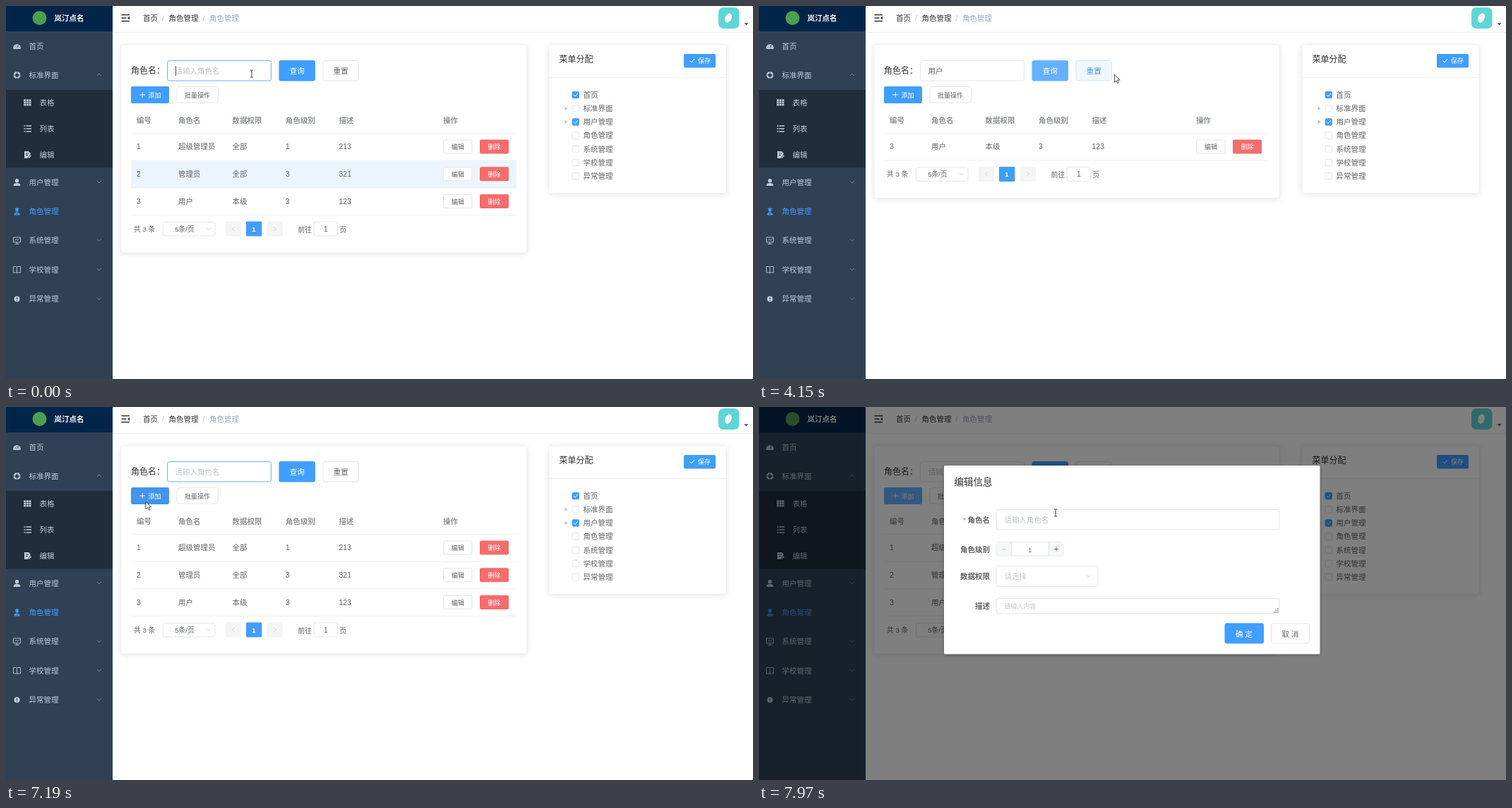
Animation of 1058 by 529 pixels, one loop 8000 ms. Source, as an HTML page:

```html
<!DOCTYPE html>
<html lang="zh">
<head>
<meta charset="utf-8">
<title>角色管理</title>
<style>
html, body { margin: 0; width: 100%; height: 100%; overflow: hidden; background: #fff; }
svg { display: block; width: 100vw; height: 100vh; }
text { font-family: "Liberation Sans", "Noto Sans CJK SC", "Noto Sans CJK", sans-serif; white-space: pre; }
.card { filter: drop-shadow(0 1.5px 4.5px rgba(0,0,0,.11)); }
.dialog { filter: drop-shadow(0 1px 2px rgba(0,0,0,.3)); }
</style>
</head>
<body>
<svg id="stage" viewBox="0 0 1058 529"></svg>
<script>
const BLUE = '#409eff', LIGHT = '#66b1ff', DARK = '#303133', GREY = '#606266',
  PALE = '#c0c4cc', EDGE = '#dcdfe6', LINE = '#ebeef5', MENU = '#bfcbd9';

// y is the visual middle of the line of text
const text = (x, y, s, size = 10.5, fill = GREY, more = '') =>
  `<text x="${x}" y="${y + size * .37}" font-size="${size}" fill="${fill}" ${more}>${s}</text>`;
const mid = 'text-anchor="middle"', bold = 'font-weight="700"';
const rect = (x, y, w, h, fill, r = 0, more = '') =>
  `<rect x="${x}" y="${y}" width="${w}" height="${h}" rx="${r}" fill="${fill}" ${more}/>`;
const framed = (x, y, w, h, more = '', fill = '#fff', stroke = EDGE, r = 3) =>
  rect(x + .5, y + .5, w - 1, h - 1, fill, r, `stroke="${stroke}" stroke-width=".8" ${more}`);
const path = (d, stroke, w = 1, fill = 'none', more = '') =>
  `<path d="${d}" stroke="${stroke}" stroke-width="${w}" fill="${fill}" ${more}/>`;
const shape = (d, fill) => path(d, 'none', 0, fill);
const at = (x, y, body, more = '') => `<g transform="translate(${x} ${y})" ${more}>${body}</g>`;
const rule = (x, y, w) => rect(x, y, w, .8, LINE);
const chevron = (x, y, dir, c = '#909399') =>
  at(x, y, `<g transform="rotate(${dir})">${path('M-3-1.5L0 1.5L3-1.5', c, .8)}</g>`);

const icons = {
  gauge: c => shape('M-5 4A5.3 5.3 0 1 1 5 4Z', c) + path('M0 2L2-2M-3 1h1M3 1h-1M-2-2l.6.6', '#304156', 1),
  ring: c => `<circle r="3.8" fill="none" stroke="${c}" stroke-width="2.5"/>` +
    path('M-5.5 0h3M2.5 0h3M0-5.5v3M0 2.5v3', '#304156', .8),
  grid: c => [0, 1, 2].map(i => [0, 1, 2].map(j => rect(i * 3.7 - 5.4, j * 3.2 - 4.6, 3, 2.6, c)).join('')).join(''),
  list: c => path('M-5-4h2M-5 0h2M-5 4h2M-2-4h7.5M-2 0h7.5M-2 4h7.5', c, 1.5),
  edit: c => shape('M-4.5-5h6l2.5 2.5V0L0 5h-4.5Z', c) + path('M-2.5-2h4M-2.5 .5h3', '#1f2d3d', .9) + path('M1.5 4.5L5 1', c, 1.5),
  user: c => `<circle cy="-2.3" r="2.7" fill="${c}"/>` + shape('M-5 5Q-5 1 0 1T5 5Z', c),
  role: c => `<circle cy="-2" r="2.3" fill="${c}"/>` + shape('M-3.5-3.5Q0-7 3.5-3.5ZM-4 5Q-4 1 0 1T4 5Z', c) + path('M-1 2.5L0 4L2 2.5', '#304156', .8),
  screen: c => path('M-5-4.5h10v7h-10ZM-3 5h6M0 2.5v2.5M-3 0L-1-2L1 0L3.5-3', c, .9),
  book: c => path('M-5-4.5H-1Q0-4.5 0-3.5Q0-4.5 1-4.5H5V4H1L0 4.8L-1 4H-5ZM0-3.5V4.5', c, .9),
  alert: c => `<circle r="4" fill="${c}"/>` + path('M0-2.2V.8M0 1.6v1', '#304156', 1.1)
};

const menu = [
  ['gauge', 57, '首页'], ['ring', 98, '标准界面', 180],
  ['grid', 137, '表格'], ['list', 174, '列表'], ['edit', 211, '编辑'],
  ['user', 250, '用户管理', 0], ['role', 291.5, '角色管理'], ['screen', 332.5, '系统管理', 0],
  ['book', 374, '学校管理', 0], ['alert', 415.5, '异常管理', 0]
].map(([icon, y, label, dir]) => {
  const sub = y > 120 && y < 230, c = icon === 'role' ? BLUE : MENU;
  return at(sub ? 30.5 : 15.5, y, icons[icon](c)) + text(sub ? 47.5 : 32.5, y, label, 10.5, c) +
    (dir === undefined ? '' : chevron(132, y - .5, dir));
}).join('');

const sidebar = rect(0, 0, 151, 529, '#304156') + rect(0, 0, 151, 36, '#012548') + rect(0, 119, 151, 110.5, '#1f2d3d') +
  '<circle cx="47.5" cy="17" r="10" fill="#4b9f50"/>' + text(68.5, 17, '岚汀点名', 10.5, '#fff', bold) + menu;

const header = path('M163.5 12.5h11.5M163.5 17h7M163.5 21.5h11.5', DARK, 1.3) + shape('M175 14.5v5l-3-2.5Z', DARK) +
  text(194, 17, '首页', 10.5, DARK) + text(221, 17, '/', 10.5, PALE) + text(230.5, 17, '角色管理', 10.5, DARK) +
  text(278.5, 17, '/', 10.5, PALE) + text(288, 17, '角色管理', 10.5, '#97a8be') +
  rect(151, 36.8, 907, .8, '#e6e8ec') + rect(1009, 2, 29.5, 30, '#5fd5d5', 7) +
  '<ellipse id="mascot" rx="4.5" ry="7" fill="#fff"/>' + shape('M1045.5 24h6l-3 3.5Z', '#5a5e66');

const columns = [185, 244, 320.5, 396, 471.5];
const row = (y, cells) => rule(177, y + 19.2, 546) + cells.map((s, i) => text(columns[i], y, s)).join('') +
  framed(619, y - 10, 41.5, 20, '', '#fff', EDGE, 2) + text(640, y + .5, '编辑', 9, GREY, mid) +
  rect(671, y - 10, 41, 20, '#f56c6c', 2) + text(691.5, y + .5, '删除', 9, '#fff', mid);

const pager = text(181, 316.5, '共 3 条', 9.75) + framed(222, 306, 74.5, 20.5) + text(253, 316.5, '5条/页', 9.75, GREY, mid) +
  chevron(287, 316, 0, PALE) + rect(311, 305.5, 22, 21, '#f4f4f5', 1.5) + chevron(322, 316, 90, PALE) +
  rect(340, 305.5, 22.3, 21, BLUE, 1.5) + text(351, 316, '1', 9.75, '#fff', mid + bold) +
  rect(370, 305.5, 22, 21, '#f4f4f5', 1.5) + chevron(381, 316, -90, PALE) +
  text(413.5, 317, '前往', 9.75) + framed(435.5, 305.5, 34.5, 21) + text(453, 316, '1', 10.5, GREY, mid) + text(472.5, 317, '页', 9.75);

const search = text(177, 92, '角色名：', 12, DARK) + framed(228, 77, 148, 29.5, 'id="field"') +
  text(239.5, 92, '', 10.5, GREY, 'id="value"') + rect(0, 85, .9, 14, DARK, 0, 'id="caret"') +
  rect(386.5, 77, 51.5, 29.5, BLUE, 3, 'id="query"') + text(412.3, 92, '查询', 10.5, '#fff', mid) +
  framed(448.5, 77, 51.5, 29.5, 'id="reset"') + text(474.3, 92, '重置', 10.5, GREY, mid + ' id="resetLabel"') +
  rect(177, 114, 54, 24, BLUE, 2.3, 'id="add"') + path('M189.5 126h7.5M193.2 122.2v7.6', '#fff', .9) + text(201.5, 126.5, '添加', 9, '#fff') +
  framed(241.5, 114, 59.5, 23.5) + text(271, 126.5, '批量操作', 9, GREY, mid);

const list = rect(163, 55, 574.5, 295, '#fff', 3, `id="card" class="card" stroke="${LINE}" stroke-width=".7"`) + search +
  ['编号', '角色名', '数据权限', '角色级别', '描述'].map((s, i) => text(columns[i], 162.5, s, 10.5, '#909399', bold)).join('') +
  text(619, 162.5, '操作', 10.5, '#909399', bold) + rule(177, 180, 546) +
  `<g id="firstRows">${rect(177, 219.5, 546, 38.5, '#ecf5ff', 0, 'id="hoverRow"')}` +
  row(199.5, ['1', '超级管理员', '全部', '1', '213']) + row(238.3, ['2', '管理员', '全部', '3', '321']) +
  `</g><g id="tail">${row(277, ['3', '用户', '本级', '3', '123'])}${pager}</g>`;

const tree = rect(769, 55, 251, 210.5, '#fff', 3, `class="card" stroke="${LINE}" stroke-width=".7"`) + rule(769, 101, 251) +
  text(783.5, 76, '菜单分配', 12, DARK) + rect(960, 68, 45, 19.5, BLUE, 2) +
  path('M968.5 77.5l2.3 2.5l4.5-5', '#fff', 1) + text(980, 78, '保存', 9, '#fff') +
  ['首页', '标准界面', '用户管理', '角色管理', '系统管理', '学校管理', '异常管理'].map((s, i) => {
    const y = 126 + i * 19.2, on = i === 0 || i === 2;
    return framed(801.5, y - 5.2, 10.5, 10.5, '', on ? BLUE : '#fff', on ? BLUE : EDGE, 1.5) +
      (on ? path(`M804.2 ${y}l2 2.2l3.4-4.4`, '#fff', 1) : '') +
      (i === 1 || i === 2 ? shape(`M791.5 ${y - 3}v6l4-3Z`, PALE) : '') + text(817.5, y, s);
  }).join('');

const label = (y, s) => text(327, y, s, 10.5, GREY, 'text-anchor="end" ' + bold);
const dialog = rect(262, 83, 532.5, 267.5, '#fff', 1.5, 'class="dialog"') + text(276.5, 106, '编辑信息', 13.5, DARK) +
  text(289, 161, '*', 10.5, '#f56c6c') + label(160, '角色名') + framed(335.5, 145, 402, 29.5) + text(347.5, 160, '请输入角色名', 10.5, PALE) +
  label(202, '角色级别') + framed(335.5, 191, 96.5, 20.5) + rect(336.3, 191.8, 21, 19, '#f5f7fa', 2) + rect(410.5, 191.8, 21, 19, '#f5f7fa', 2) +
  path('M357.5 191.5v19.5M410.5 191.5v19.5', EDGE, .8) + path('M344 201.5h6', PALE, .9) + path('M418 201.5h6M421 198.5v6', GREY, .9) +
  text(383.7, 202, '1', 9.75, GREY, mid) +
  label(240.5, '数据权限') + framed(335.5, 225, 145, 30) + text(347.5, 240.5, '请选择', 10.5, PALE) + chevron(467, 240, 0, PALE) +
  label(282.5, '描述') + framed(335.5, 271, 402, 22.5) + text(347.5, 283, '请输入内容', 9, PALE) +
  path('M729 291h1.5M731.5 291h1.5M734 291h1.5M731.5 288.5h1.5M734 288.5h1.5M734 286h1.5', '#777', 1.4) +
  rect(659.5, 306.5, 55.5, 29, BLUE, 3) + text(687, 322, '确 定', 10.5, '#fff', mid) +
  framed(725, 306.5, 55, 29) + text(752.5, 322, '取 消', 10.5, GREY, mid);

const pointers = {
  arrow: path('M0 0V11L2.6 8.6L4.3 12.4L6 11.6L4.3 7.9H7.8Z', '#222', .8, '#fff'),
  hand: path('M-1 1Q0-.6 1 1V5L5 6Q6.2 6.4 6 8L5 12.5H-.5L-3.8 8Q-3.5 6.4-1 8Z', '#222', .9, '#fff') + path('M2 5.5v2.5M4 6v2.5', '#222', .6),
  beam: path('M-2-5H-.6L0-4.5L.6-5H2M0-4.5V4.5M-2 5H-.6L0 4.5L.6 5H2', '#333', 1)
};

const stage = document.getElementById('stage');
stage.innerHTML = rect(0, 0, 1058, 529, '#fff') + header + list + tree + sidebar +
  rect(0, 0, 1058, 529, '#000', 0, 'id="mask"') + `<g id="dialog">${dialog}</g>` +
  Object.keys(pointers).map(k => `<g id="${k}">${pointers[k]}</g>`).join('');

const el = {};
stage.querySelectorAll('[id]').forEach(e => el[e.id] = e);
const set = (id, attrs) => { for (const k in attrs) el[id].setAttribute(k, attrs[k]); };
const show = (id, on) => set(id, { display: on ? 'inline' : 'none' });

const clamp = v => Math.max(0, Math.min(1, v));
const ease = p => 1 - (1 - clamp(p)) ** 2.2;
// 0 to 1 after "on", back to 0 after "off", each within 100 ms
const pulse = (t, on, off) => clamp((t - on) / 100) - clamp((t - off) / 100);
const mix = (a, b, k) => '#' + [1, 3, 5].map(i => {
  const p = parseInt(a.substr(i, 2), 16), q = parseInt(b.substr(i, 2), 16);
  return Math.round(p + (q - p) * k).toString(16).padStart(2, '0');
}).join('');

// time, x, y, pointer
const track = [
  [0, 348, 96, 'beam'], [2500, 348, 96, 'beam'], [2680, 379, 98, 'arrow'], [2780, 396, 101, 'hand'],
  [3450, 398, 101, 'hand'], [3560, 409, 104, 'hand'], [3900, 455, 100, 'hand'], [4110, 503, 97, 'arrow'],
  [4250, 505, 98, 'arrow'], [4400, 484, 97, 'hand'], [5060, 484, 98, 'hand'], [5160, 440, 98, 'arrow'],
  [5240, 372, 96, 'beam'], [5310, 306, 95, 'beam'], [5450, 290, 95, 'beam'], [6050, 290, 95, 'beam'],
  [6250, 240, 106, 'arrow'], [6450, 201, 130, 'hand'], [7000, 198, 134, 'arrow'], [7400, 198, 134, 'arrow'],
  [7640, 420, 150, 'beam'], [8000, 420, 150, 'beam']
];

function movePointer(t) {
  const i = track.findIndex(k => k[0] > t) - 1, [t0, x0, y0, kind] = track[i], [t1, x1, y1] = track[i + 1];
  const p = (t - t0) / (t1 - t0), k = p * p * (3 - 2 * p);
  for (const name in pointers) show(name, name === kind);
  set(kind, { transform: `translate(${x0 + (x1 - x0) * k} ${y0 + (y1 - y0) * k})` });
}

function typeField(t) {
  const composing = t >= 950 && t < 1800, filled = t >= 950 && t < 4500;
  el.value.textContent = composing ? "yong'hu".slice(0, 1 + Math.floor((t - 950) / 110)) : filled ? '用户' : '请输入角色名';
  set('value', { fill: filled ? GREY : PALE, 'text-decoration': composing ? 'underline' : 'none' });
  const since = t >= 5500 ? 5500 : t >= 1800 ? 1800 : composing ? t : 0;
  const focused = t < 2950 || t >= 5500 && t < 7200;
  show('caret', focused && (t - since) % 1060 < 530);
  set('caret', { x: 239.8 + (filled ? el.value.getComputedTextLength() : 0) });
  set('field', { stroke: mix(EDGE, BLUE, pulse(t, -200, 2950) + pulse(t, 5500, 7200)) });
}

function draw(t) {
  movePointer(t);
  typeField(t);
  set('query', { fill: mix(BLUE, LIGHT, pulse(t, 2870, 4450)) });
  const reset = pulse(t, 3800, 4130) + pulse(t, 4320, 5500);
  set('reset', { fill: mix('#ffffff', '#ecf5ff', reset), stroke: mix(EDGE, '#c6e2ff', reset) });
  set('resetLabel', { fill: mix(GREY, BLUE, reset) });
  set('add', { fill: mix(mix(BLUE, LIGHT, pulse(t, 6400, 9000)), '#3a8ee6', pulse(t, 7110, 7230)) });

  const filtered = t >= 3100 && t < 4600;
  show('firstRows', !filtered);
  show('hoverRow', t < 3100);
  set('tail', { transform: `translate(0 ${filtered ? -77.6 : 0})` });
  set('card', { height: filtered ? 217.4 : 295 });

  const opened = ease((t - 7225) / 300);
  set('mask', { opacity: .5 * ease((t - 7225) / 200) });
  set('dialog', { opacity: opened, transform: `translate(0 ${15 * (opened - 1)})` });
  set('mascot', { transform: `translate(1023 17) rotate(${25 + 20 * Math.sin(t / 120)})` });
}

const start = performance.now();
function frame() {
  draw((performance.now() - start) % 8000);
  requestAnimationFrame(frame);
}
frame();
</script>
</body>
</html>
```
